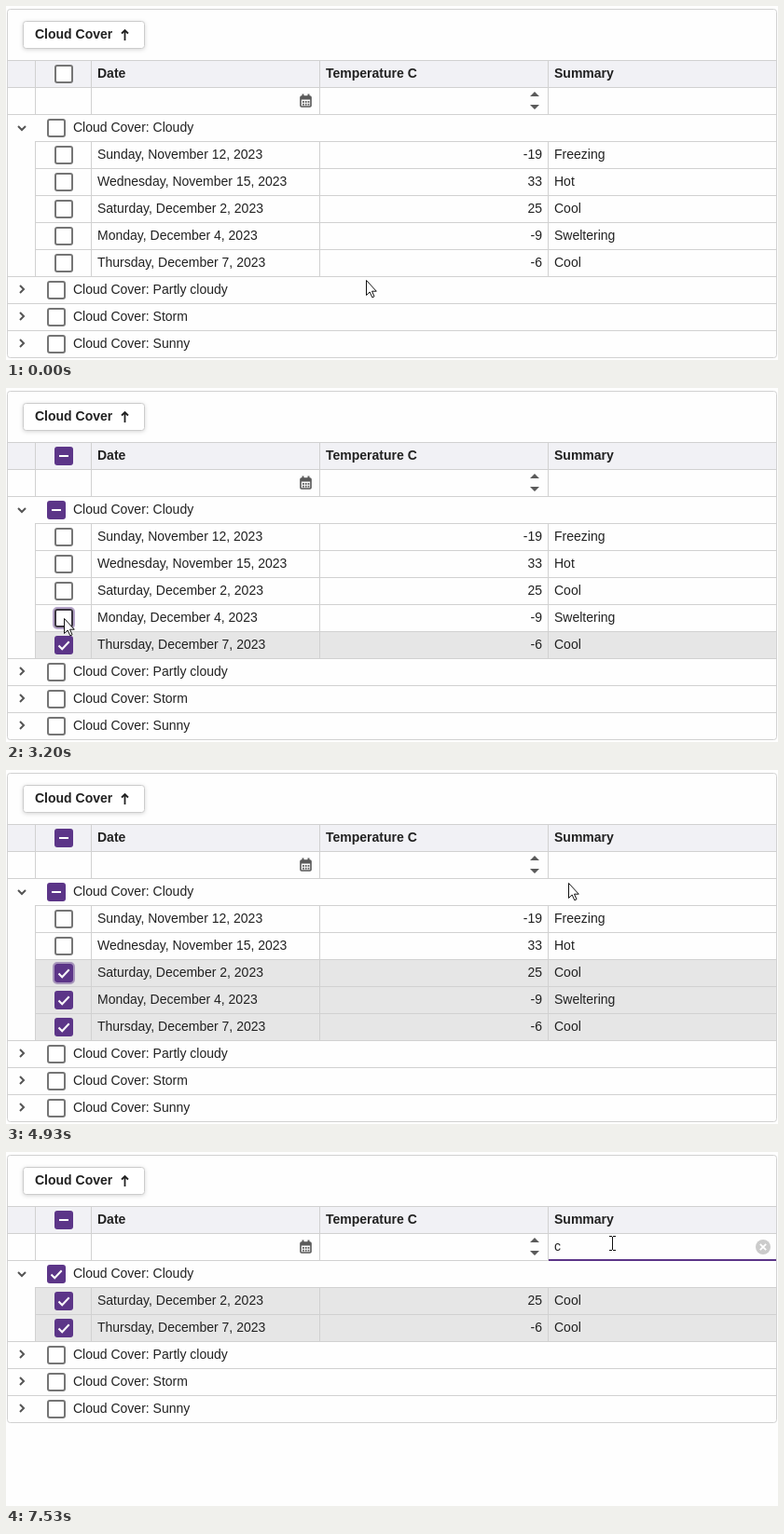
Write an HTML page that moves like this. It is 828 by 380 pixels and loops after 8 s.

```html
<!DOCTYPE html>
<html lang="en">
<head>
<meta charset="utf-8">
<title>Grouped grid selection and filter</title>
<style>
  html, body { margin: 0; width: 100%; height: 100%; overflow: hidden; background: #fefefe; }
  svg { display: block; position: absolute; left: 0; top: 0; }
  text { font: 14px "Liberation Sans", Arial, sans-serif; fill: #212121; white-space: pre; }
  .bold { font-weight: bold; }
  .line { fill: #d1d1d1; }
  .icon { fill: none; stroke: #555; stroke-width: 2; }
  .solid { fill: #5a5a5a; }
  .chip { fill: #fff; stroke: #ccc; filter: drop-shadow(0 1px 2px rgba(0, 0, 0, .16)); }
</style>
</head>
<body>
<svg width="828" height="380" viewBox="0 0 828 380">
  <g id="grid"></g>
  <g id="pointer">
    <path id="arrow" d="M.5 .5V16.5L4.2 13L6.8 18.8L9 17.8L6.5 12.2H11.3Z" fill="#fff" stroke="#111"/>
    <path id="beam" d="M-3 -7.5H0M1 -7.5H4M.5 -7V7M-3 7.5H0M1 7.5H4" fill="none" stroke="#111"/>
  </g>
</svg>
<script>
const LOOP = 8000, ROW = 29, BODY = 116, RIGHT = 826;
const PURPLE = '#5c3588';
const COLS = [31, 91, 336, 581];
const FILTER_AT = 6830;

// focus: press on the checkbox, check: row becomes selected
const ROWS = [
  { date: 'Sunday, November 12, 2023', temp: -19, sum: 'Freezing' },
  { date: 'Wednesday, November 15, 2023', temp: 33, sum: 'Hot' },
  { date: 'Saturday, December 2, 2023', temp: 25, sum: 'Cool', focus: [3800, 5200], check: 3900 },
  { date: 'Monday, December 4, 2023', temp: -9, sum: 'Sweltering', focus: [3200, 3800], check: 3300 },
  { date: 'Thursday, December 7, 2023', temp: -6, sum: 'Cool', focus: [2530, 3200], check: 2630 },
];
const CLOSED = ['Partly cloudy', 'Storm', 'Sunny'];
const CARET = [[5200, 5800, 588], [5960, 6500, 594], [7030, 7530, 594]];

const soft = p => (p + p * p * (3 - 2 * p)) / 2;
const speedUp = p => p ** 1.5;
const slowDown = p => 1 - (1 - p) ** 2;
const linear = p => p;

// time, x, y, easing towards this point
const PATH = [
  [0, 386, 294, linear], [1467, 386, 294, linear], [2260, 64, 275, soft],
  [2650, 64, 275, linear], [3030, 62, 247, soft],
  [3310, 62, 247, linear], [3500, 62, 218, soft],
  [3930, 62, 218, linear], [4200, 150, 223, speedUp],
  [4630, 430, 207, linear], [5130, 650, 98, slowDown], [LOOP, 650, 98, linear],
];

const within = (v, [a, b]) => v >= a && v < b;
const rect = (x, y, w, h, attrs) => `<rect x="${x}" y="${y}" width="${w}" height="${h}" ${attrs}/>`;
const hLine = (x, y) => rect(x, y, RIGHT - x, 1, 'class="line"');
const vLine = (x, y, h) => rect(x, y, 1, h, 'class="line"');
const label = (x, y, s, attrs = '') => `<text x="${x}" y="${y}" ${attrs}>${s}</text>`;
const shape = (d, attrs) => `<path d="${d}" ${attrs}/>`;

function checkbox(x, y, mark, hover, focus) {
  let out = focus ? rect(x - 1, y - 1, 22, 22, `rx="4" fill="none" stroke="${PURPLE}" stroke-opacity=".45" stroke-width="2"`) : '';
  if (!mark) {
    return out + rect(x + 1, y + 1, 18, 18, `rx="2" fill="#fff" stroke="${hover ? '#3b3540' : '#757575'}" stroke-width="2"`);
  }
  out += rect(x, y, 20, 20, `rx="3" fill="${PURPLE}"`);
  const d = mark === 'some' ? `M${x + 5} ${y + 10}h10` : `M${x + 4.5} ${y + 10.5}l3.7 3.7l7.5 -8`;
  return out + shape(d, 'fill="none" stroke="#fff" stroke-width="2"');
}

function calendar() {
  let out = rect(316, 97, 11, 11, 'rx="1" fill="none" stroke="#555" stroke-width="1.6"') +
    rect(316, 97, 11, 3.5, 'class="solid"') +
    rect(317.5, 94.5, 2, 3, 'class="solid"') + rect(323.5, 94.5, 2, 3, 'class="solid"');
  for (let i = 0; i < 6; i++) {
    out += rect(318 + i % 3 * 2.8, 102 + (i > 2) * 2.8, 1.8, 1.8, 'class="solid"');
  }
  return out;
}

function head(t) {
  const focused = t >= 5200;
  let out = rect(18.5, 16.5, 130, 29, 'rx="3" class="chip"') +
    label(31, 35, 'Cloud Cover', 'class="bold"') +
    shape('M127.5 37V26M124 29.5L127.5 26L131 29.5', 'fill="none" stroke="#222" stroke-width="1.8"') +
    rect(2, 59, 824, 28, 'fill="#f1f1f5"') + hLine(2, 58) + hLine(2, 87) + hLine(2, BODY) +
    COLS.map(x => vLine(x, 58, 58)).join('') +
    checkbox(52, 63, t >= 2630 && 'some') +
    label(98, 77, 'Date', 'class="bold"') +
    label(343, 77, 'Temperature C', 'class="bold"') +
    label(588, 77, 'Summary', 'class="bold"') +
    calendar() + shape('M562 97L567 92L572 97ZM562 106H572L567 111Z', 'class="solid"');
  if (focused) out += rect(582, 115, 244, 2, `fill="${PURPLE}"`);
  if (t >= 5960) out += label(588, 106, 'c');
  const caret = CARET.find(c => within(t, c));
  if (caret) out += rect(caret[2], 94, 1, 16, 'fill="#111"');
  if (t >= 6800) {
    out += '<circle cx="812" cy="102" r="8" fill="#cbcbcb"/>' +
      shape('M808.8 98.8l6.4 6.4m0 -6.4l-6.4 6.4', 'stroke="#fff" stroke-width="1.8"');
  }
  return out;
}

function groupRow(y, name, open, mark) {
  const chevron = open ? `M13 ${y + 13}l4 4l4 -4` : `M15 ${y + 10}l4 4l-4 4`;
  return shape(chevron, 'class="icon"') + checkbox(44, y + 5, mark) +
    label(72, y + 19, 'Cloud Cover: ' + name);
}

function dataRow(row, y, t, pos) {
  const on = t >= row.check;
  const hover = within(pos.x, [52, 72]) && within(pos.y, [y + 5, y + 25]);
  return (on ? rect(32, y + 1, RIGHT - 32, 28, 'fill="#e6e6e6"') : '') + hLine(31, y) +
    COLS.map(x => vLine(x, y, ROW)).join('') +
    checkbox(52, y + 5, on && 'all', hover, row.focus && within(t, row.focus)) +
    label(98, y + 19, row.date) +
    label(575, y + 19, row.temp, 'text-anchor="end"') +
    label(588, y + 19, row.sum);
}

const visibleRows = t => t < FILTER_AT ? ROWS : ROWS.filter(r => r.sum[0] === 'C');

function body(t, pos) {
  const rows = visibleRows(t);
  const mark = t >= FILTER_AT ? 'all' : t >= 2630 && 'some';
  let y = BODY;
  let out = groupRow(y, 'Cloudy', true, mark);
  for (const row of rows) out += dataRow(row, y += ROW, t, pos);
  for (const name of CLOSED) {
    y += ROW;
    out += hLine(2, y) + groupRow(y, name, false);
  }
  const bottom = y + ROW;
  return out + rect(1.5, 3.5, 825, bottom - 3, 'rx="3" fill="none" stroke="#d1d1d1"');
}

function pointerAt(t) {
  const tick = Math.floor(t * .03 + 1e-6) / .03;
  const i = Math.max(1, PATH.findIndex(k => k[0] > tick));
  const [t0, x0, y0] = PATH[i - 1], [t1, x1, y1, ease] = PATH[i];
  const p = ease((tick - t0) / (t1 - t0));
  return { x: Math.round(x0 + (x1 - x0) * p), y: Math.round(y0 + (y1 - y0) * p) };
}

function overText({ x, y }, t) {
  if (x > 581 && within(y, [88, BODY])) return true;
  return visibleRows(t).some((row, i) =>
    within(x, [98, 98 + row.date.length * 7.1]) &&
    Math.abs(y - (BODY + ROW * (i + 1) + 14)) <= 9);
}

const $ = id => document.getElementById(id);
let shown = '';

function render(t) {
  const pos = pointerAt(t);
  const html = body(t, pos) + head(t);
  if (html !== shown) $('grid').innerHTML = shown = html;
  const text = overText(pos, t);
  $('arrow').style.display = text ? 'none' : '';
  $('beam').style.display = text ? '' : 'none';
  $('pointer').setAttribute('transform', `translate(${pos.x} ${pos.y})`);
}

const start = performance.now();
function loop() {
  render((performance.now() - start) % LOOP);
  requestAnimationFrame(loop);
}
loop();
</script>
</body>
</html>
```
